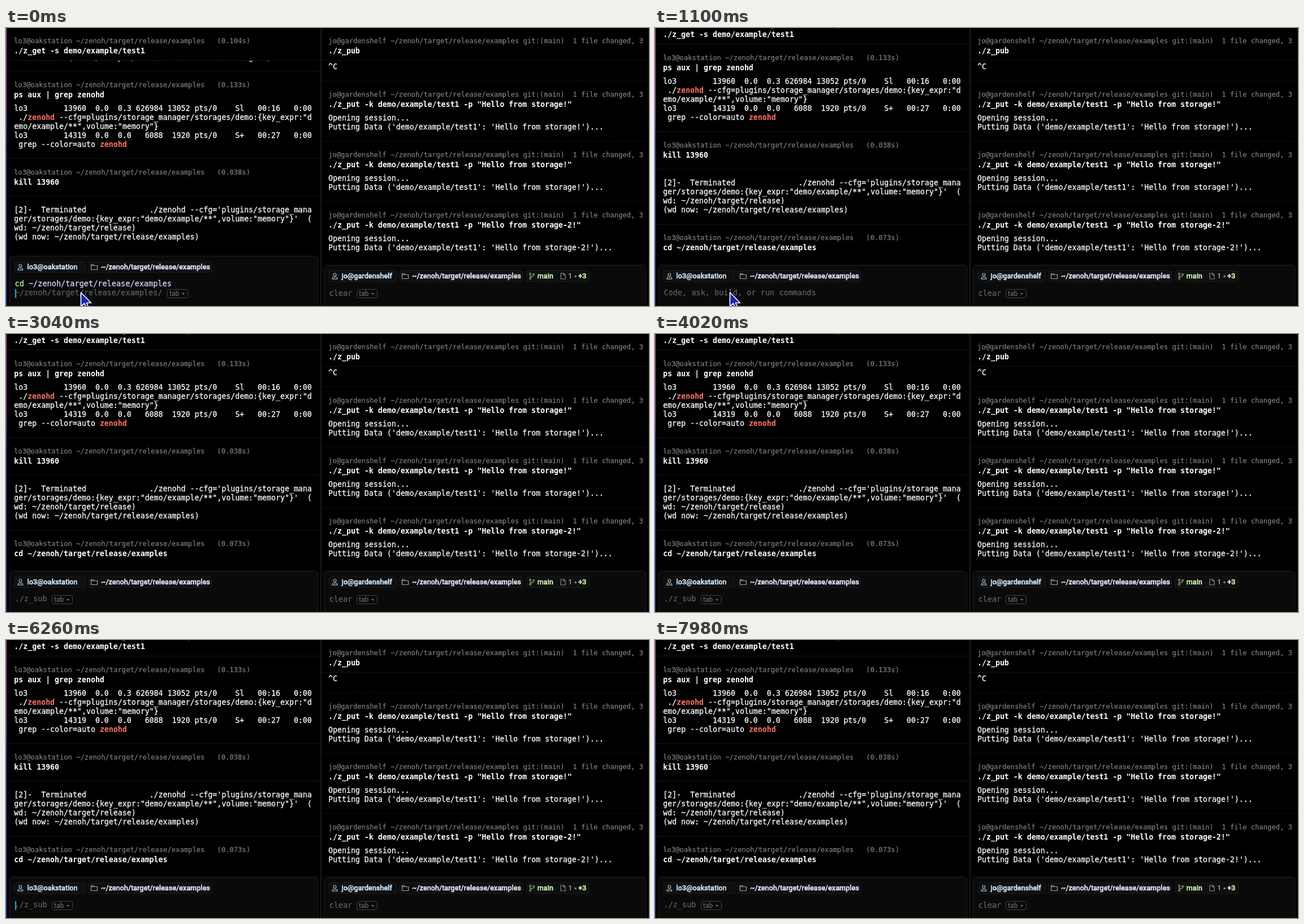
These frames come from a looping animation (1137 px wide and 493 px high, 8000 ms). An HTML page:

```html
<!DOCTYPE html>
<html lang="en">
<head>
<meta charset="utf-8">
<title>Two terminal panes</title>
<style>
html, body { margin: 0; width: 100%; height: 100%; overflow: hidden; background: #000; }
svg { display: block; width: 1137px; height: 493px; }
text, tspan { fill: currentColor; stroke: currentColor; }
text { white-space: pre; font: 13.25px "DejaVu Sans Mono", monospace; color: #f8f8f8; stroke-width: .3; }
.head { font-size: 12.18px; color: #8a8a8a; stroke-width: .1; }
.cmd { font-weight: 700; color: #fff; stroke-width: 0; }
.hit { font-weight: 700; color: #ff7365; stroke-width: 0; }
.input { font-size: 13.55px; color: #d8cdfc; }
.ghost { font-size: 13.55px; color: #696969; stroke-width: .1; }
.prog { color: #b9f58c; }
.chip { font: 500 12.7px Roboto, sans-serif; color: #e9e2fa; stroke-width: .45; }
.chip.user { color: #cde8fa; }
.chip.git { color: #cff8b0; }
.chip.dim { color: #a0a0a0; stroke-width: 0; }
.tab { font: 12px Roboto, sans-serif; color: #777; stroke-width: 0; }
.icon { fill: none; stroke: #9aa3ad; stroke-width: 1.2; stroke-linejoin: round; }
.rule { stroke: #1e1e24; stroke-dasharray: 1.5 1; }
.rule.faint { stroke: #151517; }
.panel { fill: #0a0a0a; stroke: #222; }
.box { fill: #0f0f10; stroke: #1c1c1e; }
.badge { fill: none; stroke: #444; }
.caret { fill: #22a5e8; }

.scroll, .sticky, .panelpos, .chippos, .typed, .ran, .hint, .suggest, .mouse, .keycaret {
  animation: 8s step-end infinite;
}
.scroll { animation-name: scroll; }
.sticky { animation-name: sticky; }
.panelpos { animation-name: panelpos; }
.chippos { animation-name: chippos; }
.typed { animation-name: typed; }
.ran { animation-name: ran; }
.hint { animation-name: hint; }
.suggest { animation-name: suggest; }
.mouse { animation-name: mouse; }
.keycaret { animation-name: keycaret; }
.blink { animation: blink 1s step-end infinite; }

@keyframes scroll {
  0% { transform: none; }
  1.75% { transform: translateY(-28px); }
  10.5%, 100% { transform: translateY(-48px); }
}
@keyframes sticky {
  0% { transform: none; }
  1.75% { transform: translateY(-9px); }
  10.5%, 100% { transform: translateY(-29px); }
}
@keyframes panelpos {
  0% { transform: translateY(-16px); }
  1.75% { transform: translateY(20px); }
  10.5%, 100% { transform: none; }
}
@keyframes chippos {
  0% { transform: translateY(-16px); opacity: 1; }
  1.75% { opacity: 0; transform: none; }
  10.5%, 100% { opacity: 1; transform: none; }
}
@keyframes typed { 0% { opacity: 1; } 1.75%, 100% { opacity: 0; } }
@keyframes ran { 0% { opacity: 0; } 1.75%, 100% { opacity: 1; } }
@keyframes hint { 0% { opacity: 0; } 1.75% { opacity: 1; } 27%, 100% { opacity: 0; } }
@keyframes suggest { 0% { opacity: 0; } 27%, 100% { opacity: 1; } }
@keyframes mouse { 0% { opacity: 1; } 30%, 100% { opacity: 0; } }
@keyframes keycaret { 0% { opacity: 1; } 2.4%, 100% { opacity: 0; } }
@keyframes blink { 0% { opacity: 0; } 19% { opacity: 1; } 69%, 100% { opacity: 0; } }
</style>
</head>
<body>
<svg id="stage" viewBox="0 0 1137 493"></svg>
<script>
const PATH = '~/zenoh/target/release/examples';
const LEFT_USER = 'lo3@oakstation';
const RIGHT_USER = 'jo@gardenshelf';
const LX = 14.3, RX = 570;

const group = (cls, ...parts) => `<g class="${cls}">${parts.join('')}</g>`;
const hit = word => `<tspan class="hit">${word}</tspan>`;

// y is the optical middle of the line
const text = (cls, x, y, s) => `<text class="${cls}" x="${x}" y="${y + 4}">${s}</text>`;
const lines = (x, y, rows) => rows.map((s, i) => text('', x, y + 16 * i, s)).join('');
const rule = (cls, x1, x2, y) => `<path class="rule ${cls}" d="M${x1} ${y + .5}H${x2}"/>`;
const leftRule = y => rule('', 2, 556, y);
const rightRule = (y, cls = 'faint') => rule(cls, 558, 1136, y);
const rect = (cls, x, y, w, h, r = 0) =>
  `<rect class="${cls}" x="${x}" y="${y}" width="${w}" height="${h}" rx="${r}"/>`;
const icon = (x, y, d, color = '#9aa3ad') =>
  `<path class="icon" style="stroke:${color}" transform="translate(${x} ${y})" d="${d}"/>`;

const ICONS = {
  user: 'M0-2.4a2.4 2.6 0 1 0 4.8 0a2.4 2.6 0 1 0-4.8 0M-2 5.2V4.5Q-2 2 .5 2H4.3Q6.8 2 6.8 4.5V5.2Z',
  folder: 'M0-4.5H4L5.5-2.5H11V4.5H0ZM0-2.5H5.5',
  branch: 'M2-2.5V2.5M2 1Q8 1.5 8-1.5M.5-4a1.5 1.5 0 1 0 3 0a1.5 1.5 0 1 0-3 0' +
    'M.5 4a1.5 1.5 0 1 0 3 0a1.5 1.5 0 1 0-3 0M6.5-3a1.5 1.5 0 1 0 3 0a1.5 1.5 0 1 0-3 0',
  file: 'M0-5H5L8-2V5H0ZM5-5V-2H8'
};

function leftBlock(y, time, command) {
  return text('head', LX, y, `${LEFT_USER} ${PATH}   (${time}s)`) + text('cmd', LX, y + 18, command);
}

function rightBlock(y, command) {
  return text('head', RX, y, `${RIGHT_USER} ${PATH} git:(main)  1 file changed, 3`) +
    text('cmd', RX, y + 18, command);
}

function putBlock(y, message) {
  const key = 'demo/example/test1';
  return rightRule(y - 25) + rightBlock(y, `./z_put -k ${key} -p "${message}"`) +
    lines(RX, y + 42, ['Opening session...', `Putting Data ('${key}': '${message}')...`]);
}

function chips(x, user, userWidth) {
  const px = x + userWidth + 6;
  return rect('box', x + .5, 430.5, userWidth, 19, 3) + icon(x + 8, 440, ICONS.user, '#9dbccd') +
    text('chip user', x + 22.5, 440, user) +
    rect('box', px + .5, 430.5, 217, 19, 3) + icon(px + 4.5, 440, ICONS.folder) +
    text('chip', px + 22, 440, PATH);
}

function tabBadge(x) {
  return rect('badge', x + .5, 463.5, 36, 15, 3) + text('tab', x + 4, 471, 'tab') +
    `<path fill="#777" d="M${x + 26} 470h5l-2.5 3z"/>`;
}

const panel = (x, w) => rect('panel', x + .5, 420.5, w, 130, 5);
const caret = cls => group(cls, rect('caret', 16, 463, 2.2, 15.5));

const history = group('scroll',
  lines(LX, 53, [`&gt;&gt; Received ('demo/example/test1': 'Hello from storage!')`]),
  leftRule(76),
  leftBlock(101, '0.133', 'ps aux | grep zenohd'),
  lines(LX, 143, [
    'lo3        13960  0.0  0.3 626984 13052 pts/0    Sl   00:16   0:00',
    ` ./${hit('zenohd')} --cfg=plugins/storage_manager/storages/demo:{key_expr:"d`,
    'emo/example/**",volume:"memory"}',
    'lo3        14319  0.0  0.0   6088  1920 pts/0    S+   00:27   0:00',
    ` grep --color=auto ${hit('zenohd')}`
  ]),
  leftRule(231),
  leftBlock(256, '0.038', 'kill 13960'),
  leftRule(298),
  lines(LX, 323, [
    `[2]-  Terminated              ./zenohd --cfg='plugins/storage_mana`,
    `ger/storages/demo:{key_expr:"demo/example/**",volume:"memory"}'  (`,
    'wd: ~/zenoh/target/release)',
    '(wd now: ~/zenoh/target/release/examples)'
  ]),
  group('ran', leftRule(396), leftBlock(420, '0.073', `cd ${PATH}`))
);

const stickyHead = group('sticky',
  '<path d="M2 0H556V57.5H2Z"/>', leftRule(57),
  leftBlock(23, '0.104', './z_get -s demo/example/test1'));

const leftInput =
  group('panelpos', panel(6, 545)) +
  group('chippos', chips(15, LEFT_USER, 125)) +
  group('typed',
    text('input', 15.5, 454, `<tspan class="prog">cd</tspan> ${PATH}`),
    text('ghost', 15.5, 470, `${PATH}/`), tabBadge(285)) +
  group('hint', text('ghost', 15.5, 470, 'Code, ask, build, or run commands')) +
  group('suggest', text('ghost', 15.5, 470, './z_sub'), tabBadge(81)) +
  caret('keycaret') + caret('blink');

const rightPane =
  rightBlock(23, './z_pub') + rightRule(57, '') + lines(RX, 69, ['^C']) +
  putBlock(118, 'Hello from storage!') +
  putBlock(225, 'Hello from storage!') +
  putBlock(332, 'Hello from storage-2!') +
  panel(562, 569) + chips(571, RIGHT_USER, 119) +
  rect('box', 920.5, 430.5, 111, 19, 3) +
  icon(925, 440, ICONS.branch, '#8fae7c') + text('chip git', 939.5, 440, 'main') +
  icon(981, 440, ICONS.file, '#8a8a8a') + text('chip dim', 994, 440, '1') +
  '<circle cx="1007" cy="440.5" r="1.8" fill="#8a8a8a"/>' + text('chip git', 1012, 440, '+3') +
  text('ghost', 571.5, 471, 'clear') + tabBadge(620);

const pointer = group('mouse',
  `<path d="M132.5 469V494L138.5 488.5L143 499L147 497L142.5 487.5H150.5Z"
    fill="#1526b4" stroke="#fff" stroke-width="1.7" stroke-linejoin="round"/>`);

document.getElementById('stage').innerHTML = `
  <defs><linearGradient id="edge" x2="0" y2="1">
    <stop stop-color="#8b3f7c"/><stop offset=".33" stop-color="#7a3f96"/>
    <stop offset=".37" stop-color="#2b3fae"/><stop offset="1" stop-color="#1c2f9c"/>
  </linearGradient></defs>
  <path d="M0 0H1137V493H0Z"/>
  ${history}${stickyHead}${leftInput}${rightPane}
  <path d="M0 0H1.5V493H0Z" fill="url(#edge)"/>
  <path d="M557 0V493" stroke="#343434"/>
  <path d="M1136.5 0V493" stroke="#1c1c1c"/>
  ${pointer}`;
</script>
</body>
</html>
```
